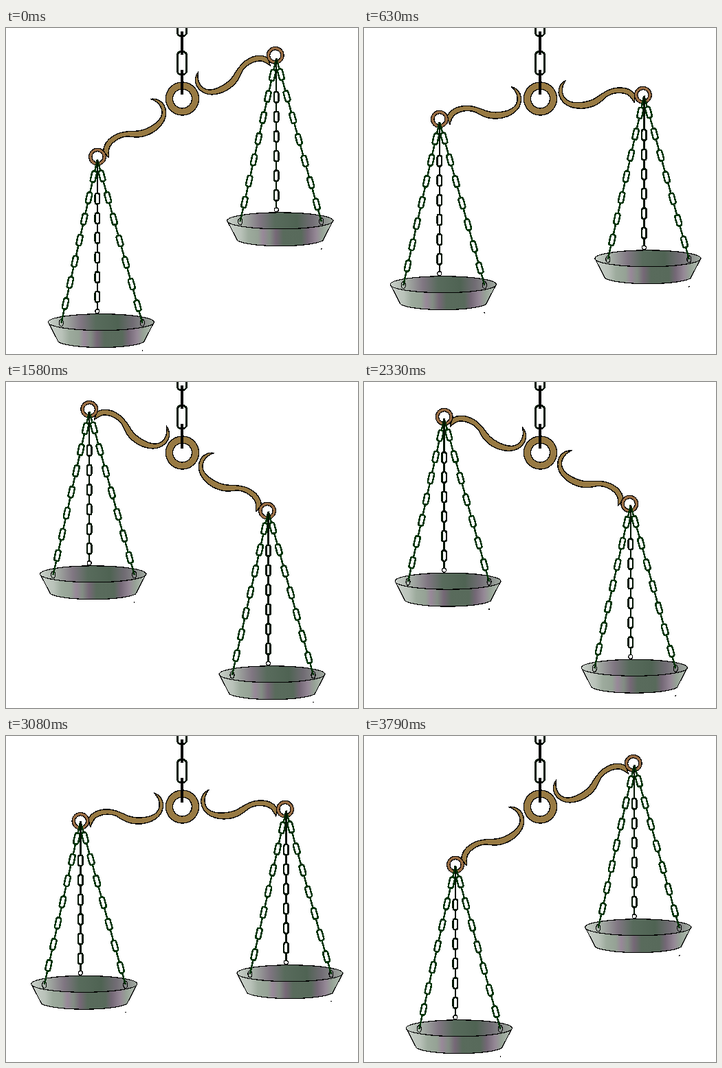
Animation, 512 px wide and 475 px high, one loop 4370 ms. Source, as an HTML page:

```html
<!DOCTYPE html>
<html lang="en">
<head>
<meta charset="utf-8">
<title>Balance scales</title>
<style>
  html, body { margin: 0; width: 100%; height: 100%; overflow: hidden; background: #fff; }
  svg { display: block; width: 512px; height: 475px; shape-rendering: crispEdges; }
</style>
</head>
<body>
<svg viewBox="0 0 512 475">
  <defs>
    <linearGradient id="bowl">
      <stop offset="0" stop-color="#ccd2cc"/>
      <stop offset=".13" stop-color="#b9c2b9"/>
      <stop offset=".2" stop-color="#9dab9d"/>
      <stop offset=".29" stop-color="#95a295"/>
      <stop offset=".34" stop-color="#988899"/>
      <stop offset=".4" stop-color="#828d83"/>
      <stop offset=".46" stop-color="#766877"/>
      <stop offset=".53" stop-color="#596b5c"/>
      <stop offset=".7" stop-color="#586a5b"/>
      <stop offset=".76" stop-color="#746876"/>
      <stop offset=".84" stop-color="#958896"/>
      <stop offset=".9" stop-color="#96a396"/>
      <stop offset="1" stop-color="#bac3ba"/>
    </linearGradient>
    <linearGradient id="inside">
      <stop offset="0" stop-color="#cbd2cb"/>
      <stop offset=".15" stop-color="#a6afa6"/>
      <stop offset=".31" stop-color="#807682"/>
      <stop offset=".45" stop-color="#586b5c"/>
      <stop offset=".66" stop-color="#4f6353"/>
      <stop offset=".8" stop-color="#716c74"/>
      <stop offset="1" stop-color="#a1aba1"/>
    </linearGradient>
    <path id="arm" d="M40-23C33-20 28-14 27.5-6C28 8 38 18.5 58 20.8C75 22 85 16.5 95 8.5C103 3.5 116 2.5 126 8C132 12 133 17 135 21C137 18 136 13 137.5 9C131-1 119-4 107-2.8C96-1.5 88 4 80 8C68 13.5 50 13 41 8C31 2 30-12 40-23Z"/>
    <!-- origin: the speck below the right edge of the pan -->
    <g id="tray">
      <g transform="translate(-60 -41)" stroke="#000" stroke-width="1.2">
        <path d="M-77 0L-62 29C-42 39.5 42 39.5 62 29L77 0Z" fill="url(#bowl)"/>
        <ellipse rx="77" ry="12" fill="url(#inside)"/>
      </g>
      <g fill="none" stroke="#000" stroke-width="1.2">
        <ellipse cx="-118" cy="-40" rx="3" ry="5"/>
        <ellipse cy="-40" rx="3" ry="5"/>
        <circle cx="-65.5" cy="-57" r="3" fill="#fff"/>
      </g>
      <g id="chains"></g>
      <circle r=".9"/>
    </g>
  </defs>

  <g id="beam" fill="#987a43" stroke="#000" stroke-width="1.4">
    <use href="#arm"/>
    <use href="#arm" transform="scale(-1 1)"/>
  </g>
  <g fill="none" stroke="#000">
    <circle cx="256.5" cy="103" r="19" stroke-width="11.5"/>
    <circle cx="256.5" cy="103" r="19" stroke="#987a43" stroke-width="8.8"/>
    <g stroke="#021402" stroke-width="3">
      <rect x="249.5" y="-23.5" width="13" height="35" rx="5"/>
      <rect x="249.5" y="34.5" width="13" height="33" rx="5"/>
    </g>
    <path d="M256 5V39M256 61V97" stroke-width="3.6"/>
  </g>
  <g id="ends"></g>
</svg>
<script>
const LOOP = 4370, FPS = 24;
const PIVOT = { x: 256.5, y: 103.5 }, REACH = 149, DROP = 11.8;
const byId = id => document.getElementById(id);

// Motion keys as [tick, value]
const tilt = [[0, -29.74], [13, -10.1], [26, 11.7], [38, 29.74],
              [53, 29.74], [66, 10.1], [79, -11.7], [91, -29.74]];
const sides = [
  { dir: -1, dx: 65.4, hang: [[0, 282], [15, 282], [24, 280.2], [38, 281], [53, 281], [66, 278.8], [81, 278.1], [91, 279.1]] },
  { dir: 1, dx: 67, hang: [[0, 282], [15, 279.1], [38, 279.1], [53, 279.1], [66, 281.6], [81, 278.7], [91, 279.9]] }
];

function valueAt(keys, tick) {
  const i = keys.findIndex(key => key[0] > tick);
  if (i < 0) return keys[keys.length - 1][1];
  const [t0, a] = keys[i - 1], [t1, b] = keys[i];
  return a + (b - a) * (tick - t0) / (t1 - t0);
}

// A chain runs from the shared top point to (x, y); links sit at evenly spaced heights.
function chain(x, y, color, width, height, firstY, lastY, count) {
  const topX = -65.5, topY = -278;
  const slope = (x - topX) / (y - topY);
  const angle = -Math.atan(slope) * 180 / Math.PI;
  let out = `<path d="M${topX} ${topY}L${x} ${y}"/>`;
  for (let i = 0; i < count; i++) {
    const cy = firstY + (lastY - firstY) * i / (count - 1);
    const cx = topX + (cy - topY) * slope;
    out += `<rect x="${-width / 2}" y="${-height / 2}" width="${width}" height="${height}" rx="2.8"
      fill="#fff" transform="translate(${cx} ${cy}) rotate(${angle})"/>`;
  }
  return `<g stroke="${color}" stroke-width="2.5">${out}</g>`;
}

byId('chains').innerHTML =
  chain(-118, -40, '#003306', 7, 16, -253, -68, 7) +
  chain(0, -40, '#003306', 7, 16, -254, -65, 7) +
  chain(-65.5, -59, '#021402', 6.4, 15.5, -221, -78, 6);

byId('ends').innerHTML = sides.map(() => `
  <g fill="none">
    <circle r="10.2" stroke="#000" stroke-width="5.6"/>
    <circle r="10.2" stroke="#9a6e45" stroke-width="3.2"/>
  </g>
  <use href="#tray"/>`).join('');
const rings = byId('ends').querySelectorAll('g');
const trays = byId('ends').querySelectorAll('use');
const place = (el, x, y) => el.setAttribute('transform', `translate(${x} ${y})`);

function draw(ms) {
  const tick = Math.floor((ms % LOOP + 5) * FPS / 1000);
  const angle = valueAt(tilt, tick);
  const s = Math.sin(angle * Math.PI / 180), c = Math.cos(angle * Math.PI / 180);
  byId('beam').setAttribute('transform', `translate(${PIVOT.x} ${PIVOT.y}) rotate(${angle})`);
  sides.forEach(({ dir, dx, hang }, i) => {
    const x = PIVOT.x + dir * REACH * c - DROP * s;
    const y = PIVOT.y + dir * REACH * s + DROP * c;
    place(rings[i], x, y);
    place(trays[i], x + dx, y + valueAt(hang, tick));
  });
}

const start = performance.now();
function loop() {
  draw(performance.now() - start);
  requestAnimationFrame(loop);
}
loop();
</script>
</body>
</html>
```
